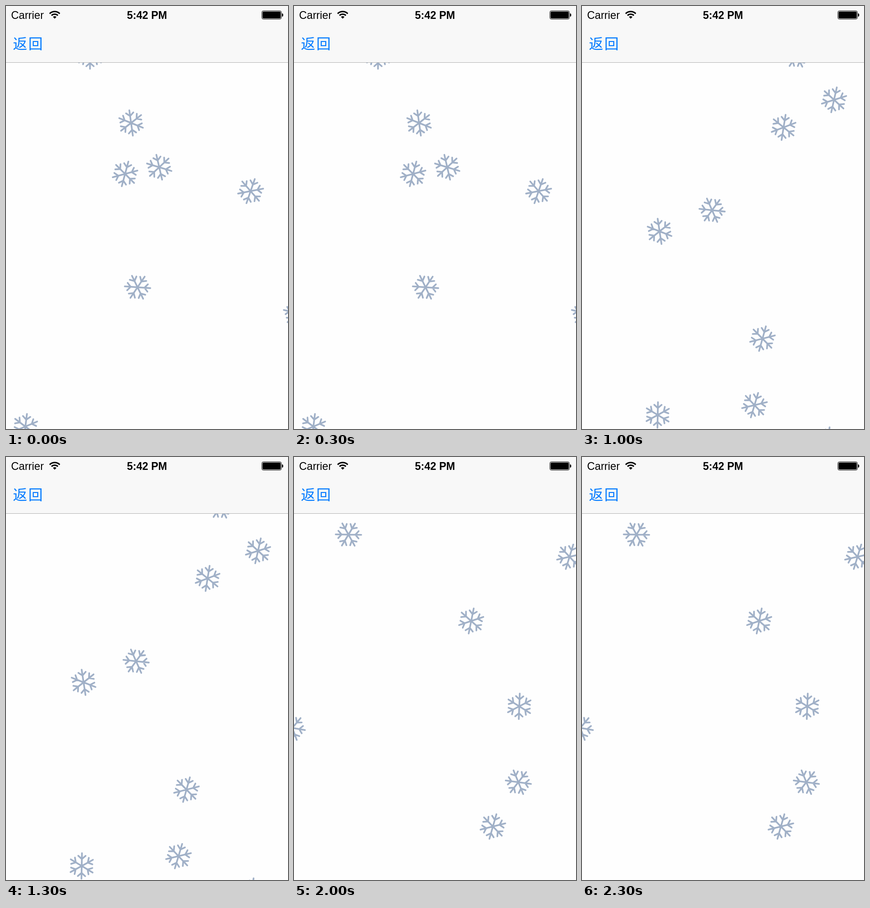
Write an HTML page with a canvas that moves like this. It is 611 px wide and 917 px high and loops after 2.5 s.

```html
<!DOCTYPE html>
<html lang="zh-CN">
<head>
<meta charset="utf-8">
<title>Snow</title>
<style>
  html, body { margin: 0; width: 100%; height: 100%; overflow: hidden; background: #fefefe; }
  canvas { display: block; }
</style>
</head>
<body>
<canvas id="stage" width="611" height="917"></canvas>
<script>
const ctx = document.getElementById('stage').getContext('2d');
const WIDTH = 611, HEIGHT = 917, BAR = 122, HOLD = 500;
const TOP = -93, GRAVITY = 65;

// The fall is shown as a slideshow of uneven moments, each held equally long.
const moments = [0, 1, 1.74, 2.69, 3.675];

// A flake starts at rest above the stage, then drifts, falls and spins freely.
// x and tilt hold at moment 0; drift and spin are per unit of time.
const flake = (born, x, tilt, drift = 0, spin = 0) => ({ born, x, tilt, drift, spin });
const flakes = [
  flake(-5.56, 42, 7),
  flake(-4.83, 629, -17),
  flake(-4.65, 285, -26, -23, 26),
  flake(-3.9, 530, 19, 2, 27),
  flake(-3.75, 258, 15, -54, 130),
  flake(-3.69, 332, -13, 24, 86),
  flake(-3.265, 271, -8, 69, 48),
  flake(-2.49, 182, 0, -8, 64),
  flake(-2.32, 341, 16, -34, 115),
  flake(-1.57, 442, 3, -3, 3.5),
  flake(-1.28, 600, -10, -31, 13),
  flake(-0.9, -55, -20, 14),
  flake(-0.74, 444, 1, 12, -16),
  flake(-0.04, 564, -18, -49, 8),
  flake(0.59, 597, 17),
  flake(0.84, 118, -29)
];

function drawFlake({ born, x, tilt, drift, spin }, time) {
  const age = Math.max(0, time - born);
  ctx.save();
  ctx.translate(x + drift * time, TOP + GRAVITY * age * age / 2);
  ctx.rotate((tilt + spin * time) * Math.PI / 180);
  ctx.beginPath();
  for (let arm = 0; arm < 6; arm++) {
    ctx.moveTo(0, 0);
    ctx.lineTo(0, -27.7);
    ctx.moveTo(-8, -22);
    ctx.lineTo(0, -15);
    ctx.lineTo(8, -22);
    ctx.rotate(Math.PI / 3);
  }
  ctx.strokeStyle = '#a0b0c7';
  ctx.lineWidth = 3.6;
  ctx.lineCap = ctx.lineJoin = 'round';
  ctx.stroke();
  ctx.restore();
}

function drawText(text, x, y, font, color = '#000', align = 'left', spacing = 0) {
  ctx.font = font;
  ctx.fillStyle = color;
  ctx.textAlign = align;
  ctx.letterSpacing = spacing + 'px';
  ctx.fillText(text, x, y);
}

function drawWifi(x, y) {
  const left = -Math.PI * 0.75, right = -Math.PI * 0.25;
  ctx.fillStyle = '#000';
  for (let ring = 0; ring < 3; ring++) {
    const outer = 5.5 + ring * 5.75;
    ctx.beginPath();
    ctx.arc(x, y, outer, left, right);
    ctx.arc(x, y, ring && outer - 3.1, right, left, true);
    ctx.fill();
  }
}

function roundRect(x, y, w, h, r) {
  ctx.beginPath();
  ctx.roundRect(x, y, w, h, r);
}

function drawBattery() {
  ctx.strokeStyle = ctx.fillStyle = '#000';
  ctx.lineWidth = 1;
  roundRect(554.3, 10.4, 42.4, 18.2, 3.5);
  ctx.stroke();
  roundRect(555.8, 11.9, 39.4, 15.2, 2);
  ctx.fill();
  roundRect(598, 16, 2.5, 7, [0, 2.5, 2.5, 0]);
  ctx.fill();
}

function drawBar() {
  const sans = '"Liberation Sans", Arial, sans-serif';
  const cjk = '"Noto Sans CJK SC Light", "Noto Sans CJK SC", "Noto Sans CJK", sans-serif';
  ctx.fillStyle = '#f8f8f8';
  ctx.fillRect(0, 0, WIDTH, BAR);
  ctx.fillStyle = '#b2b2b2';
  ctx.fillRect(0, BAR, WIDTH, 1);
  drawText('Carrier', 11, 28, `23.2px ${sans}`);
  drawText('5:42 PM', 305.5, 28, `bold 23px ${sans}`, '#000', 'center');
  drawText('返回', 15, 92.5, `300 31px ${cjk}`, '#007aff', 'left', 2.5);
  drawWifi(105.5, 27.5);
  drawBattery();
}

function render(elapsed) {
  const time = moments[Math.floor(elapsed / HOLD) % moments.length];
  ctx.fillStyle = '#fefefe';
  ctx.fillRect(0, 0, WIDTH, HEIGHT);
  flakes.forEach(f => drawFlake(f, time));
  drawBar();
}

let start;
function tick(now) {
  start ??= now;
  render(now - start);
  requestAnimationFrame(tick);
}
render(0);
requestAnimationFrame(tick);
</script>
</body>
</html>
```
